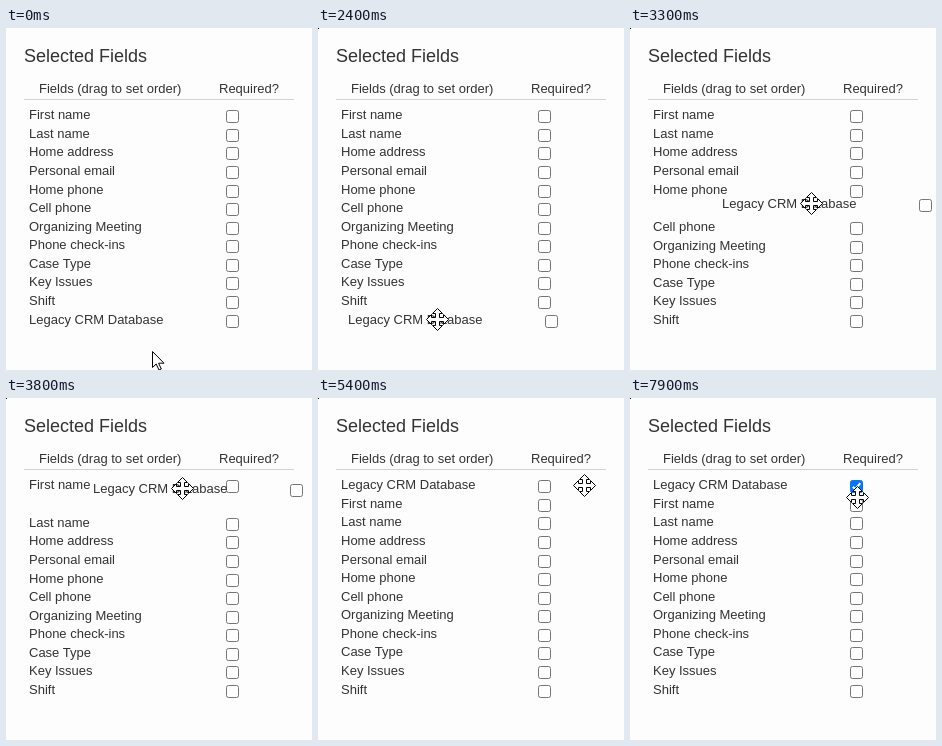
Animation of 306 by 342 pixels, one loop 8 s. Source, as an HTML page:

```html
<!DOCTYPE html>
<html lang="en">
<head>
<meta charset="utf-8">
<title>Selected Fields</title>
<style>
  html, body { margin: 0; height: 100%; overflow: hidden; background: #fdfdfd; }
  svg { display: block; width: 306px; height: 342px; }
  text { font: 13px "Liberation Sans", Arial, sans-serif; fill: #333; }
  .title { font-size: 18px; }
  .box { fill: #fff; stroke: #767676; }
  .hover .box { stroke: #4f4f4f; }
  .tick { fill: none; stroke: #fff; stroke-width: 2; visibility: hidden; }
  .checked .box { fill: #0075ff; stroke: #0075ff; }
  .checked.hover .box { fill: #005cc8; stroke: #005cc8; }
  .checked .tick { visibility: visible; }
  .cursor { fill: #fff; stroke: #000; stroke-linejoin: round; }
</style>
</head>
<body>
<svg viewBox="0 0 306 342">
  <rect id="dot" width="1" height="1"/>
  <text class="title" x="18" y="34">Selected Fields</text>
  <text x="33" y="65">Fields (drag to set order)</text>
  <text x="213" y="65">Required?</text>
  <path d="M18 71.5H288" stroke="#d2d2d2"/>
  <g id="list"></g>
  <path id="arrow" class="cursor" d="M.5.5V16.5L4.2 13L7 19L9.3 18L6.6 12.2H12Z"/>
  <path id="move" class="cursor"/>
</svg>
<script>
const LOOP = 8000, STEP = 100;
const TOP = 87.35, PITCH = 18.57, GAP = 19;
const GRAB = 2300, DROP = 4500, CHECK = 6400;
const names = ["First name", "Last name", "Home address", "Personal email",
  "Home phone", "Cell phone", "Organizing Meeting", "Phone check-ins",
  "Case Type", "Key Issues", "Shift", "Legacy CRM Database"];
const last = names.length - 1;

// Pointer strokes; bulge bends a stroke to the right
const strokes = [
  { from: 100, to: 200, x: 143, y: 319 },
  { from: 800, to: 1100, x: 113, y: 297 },
  { from: 1200, to: 1500, x: 112, y: 292 },
  { from: 2200, to: 2400, x: 119, y: 291 },
  { from: 2500, to: 2800, x: 159, y: 260 },
  { from: 2800, to: 3800, x: 176, y: 90, bulge: 13 },
  { from: 3800, to: 4300, x: 172, y: 82 },
  { from: 4800, to: 5700, x: 227, y: 89, bulge: 66 },
  { from: 7800, to: 7900, x: 227, y: 99 }
];

const $ = id => document.getElementById(id);
const clamp = (v, lo, hi) => Math.max(lo, Math.min(hi, v));
const place = (el, x, y) =>
  el.setAttribute("transform", `translate(${Math.round(x)} ${Math.round(y)})`);
const show = (el, on) => { el.style.display = on ? "" : "none"; };

// Four-way cursor: one arrowhead and stem turned four times
const quarter = [[0, -11], [5, -6], [2, -6], [2, -2], [6, -2], [6, -5]];
const turn = ([x, y], n) => n ? turn([-y, x], n - 1) : [x + .5, y + .5];
$("move").setAttribute("d",
  "M" + [0, 1, 2, 3].flatMap(n => quarter.map(p => turn(p, n))).join("L") + "Z");

$("list").innerHTML = names.map(name => `<g>
  <text x="23" y="4">${name}</text>
  <rect class="box" x="220.5" y="-4.5" width="12" height="12" rx="2"/>
  <path class="tick" d="M222.8 1.7L225.3 4.2L230.3 -1.8"/></g>`).join("");
const rows = [...$("list").children];

function pointer(t) {
  let x = 146, y = 323;
  for (const s of strokes) {
    const f = clamp((t - s.from) / (s.to - s.from), 0, 1);
    x += (s.x - x) * f + (s.bulge || 0) * Math.sin(Math.PI * f);
    y += (s.y - y) * f;
  }
  return [Math.round(x), Math.round(y)];
}

function draw(now) {
  const t = Math.floor(now % LOOP / STEP) * STEP;
  const [x, y] = pointer(t);
  const dragging = t >= GRAB && t < DROP;
  const dx = x - 112, dy = y - 291;

  // The open slot follows the dragged row; its placeholder is a little taller
  const gap = t < GRAB ? last
    : dragging ? clamp(Math.ceil(last + dy / PITCH), 1, last) : 0;
  const extra = dragging ? GAP - PITCH : 0;

  rows.forEach((row, i) => {
    const below = i < last && i >= gap;
    const slot = i === last ? gap : i + below;
    if (i === last && dragging) place(row, dx, 292 + dy);
    else place(row, 0, TOP + PITCH * slot + below * extra);
  });
  rows[last].classList.toggle("hover", t >= 5700 && t < 7900);
  rows[last].classList.toggle("checked", t >= CHECK);

  const moving = t >= 1100 && t < 5700 || t >= 7900;
  show($("move"), moving);
  show($("arrow"), !moving);
  show($("dot"), t >= 100);
  place($("move"), x, y);
  place($("arrow"), x, y);
}

const start = performance.now();
function tick() {
  draw(performance.now() - start);
  requestAnimationFrame(tick);
}
tick();
</script>
</body>
</html>
```
